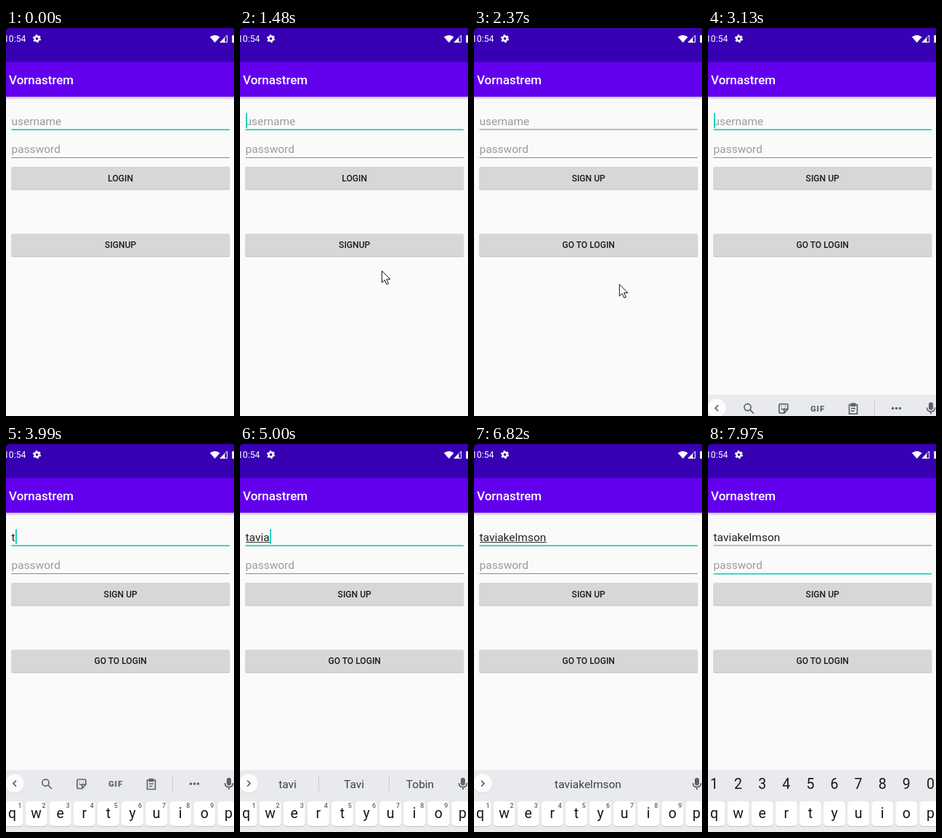
An HTML page for the animation above (8000 ms loop, 314 by 531 pixels).

```html
<!DOCTYPE html>
<html lang="en">
<head>
<meta charset="utf-8">
<title>Sign-up screen</title>
<style>
  html, body { margin: 0; width: 100%; height: 100%; overflow: hidden; background: #fafafa; }
  svg { display: block; width: 100vw; height: 100vh; font-family: Roboto, sans-serif; }
  .mid { text-anchor: middle; }
  .title { font-size: 17px; font-weight: 500; fill: #fff; }
  .field { font-size: 15.5px; }
  .label { font-size: 12.1px; font-weight: 500; fill: #1c1c1c; }
  .word { font-size: 15.5px; fill: #3c4043; }
  .key { font-size: 19.5px; fill: #15171a; }
  .hint { font-size: 9px; font-weight: 500; fill: #5f6368; }
  .icon { fill: none; stroke: #5f6368; stroke-width: 1.7; }
</style>
</head>
<body>
<svg id="stage" viewBox="0 0 314 531" preserveAspectRatio="none">
  <defs>
    <linearGradient id="shade" x2="0" y2="1">
      <stop stop-color="#000" stop-opacity=".25"/>
      <stop offset="1" stop-color="#000" stop-opacity="0"/>
    </linearGradient>
  </defs>
  <g id="screens"></g>

  <g id="status" fill="#fff">
    <path d="M0 0H5Q1 .6 0 3Z" fill="#000"/>
    <text x="-3" y="19" font-size="12.2">10:54</text>
    <g fill="none" stroke="#fff" transform="translate(42.5 14.5)">
      <circle r="3" stroke-width="2.4"/>
      <circle r="4.7" stroke-width="1.8" stroke-dasharray="2.6 2.32"/>
    </g>
    <path d="M280.8 12.3Q287.7 7 294.6 12.3L287.7 20Z"/>
    <path d="M295 19.5L304.5 10V19.5Z" fill="none" stroke="#fff"/>
    <path d="M295 19.5L301.5 13V19.5Z"/>
    <rect x="311.3" y="10" width="5" height="10"/>
  </g>

  <g id="keyboard">
    <rect y="446" width="314" height="320" fill="#e8eaed"/>
    <g id="bar">
      <circle cx="12" cy="465.2" r="13" fill="#c9cbce"/>
      <circle cx="12" cy="464.6" r="13" fill="#fcfcfc"/>
      <path id="chevron" class="icon"/>
      <g id="tools" class="icon">
        <circle cx="54.5" cy="463.5" r="4.6"/><path d="M58 467L63 472"/>
        <path d="M100 459H108Q110 459 110 461V466L105 471.500H100Q98 471.500 98 469.500V461Q98 459 100 459ZM110 466H105V471M101 465Q104 468 106 465M101 462.500H102M106 462.500H107"/>
        <text x="151" y="469" class="mid" font-size="11.500" font-weight="900" fill="#5f6368" stroke="none" letter-spacing=".8">GIF</text>
        <path d="M194.500 460H205.500V472.500H194.500ZM197.500 458.500H202.500V461.500H197.500ZM197 465H203M197 468.500H201.500"/>
        <path d="M229.500 455V475" stroke="#c8cacd" stroke-width="1"/>
        <g fill="#5f6368" stroke="none"><circle cx="254.500" cy="465" r="1.800"/><circle cx="259.500" cy="465" r="1.800"/><circle cx="264.500" cy="465" r="1.800"/></g>
      </g>
      <g id="words"></g>
      <path id="dividers" d="M108.500 455V475M205.500 455V475" stroke="#c8cacd"/>
      <g class="icon">
        <rect x="304.800" y="457.500" width="4.400" height="9" rx="2.200" fill="#5f6368"/>
        <path d="M301.500 464Q301.500 469.500 307 469.500T312.500 464M307 469.500V473"/>
      </g>
    </g>
    <g id="digits"></g>
    <g id="keys"></g>
    <g id="hints"></g>
  </g>

  <path id="mouse" d="M0 0V16L3.800 12.500L6.500 18.500L9 17.400L6.300 11.500H11.500Z" fill="#fff" stroke="#111" stroke-linejoin="round"/>
</svg>

<script>
const LOOP = 8000;
const NAME = "taviakelmson";
const ACCENT = "#0bd0bc";
const $ = id => document.getElementById(id);

function add(parent, tag, attrs = {}, text = "") {
  const el = document.createElementNS("http://www.w3.org/2000/svg", tag);
  for (const k in attrs) el.setAttribute(k, attrs[k]);
  el.textContent = text;
  return parent.appendChild(el);
}
const set = (el, attrs) => { for (const k in attrs) el.setAttribute(k, attrs[k]); };
const show = (el, on) => set(el, { opacity: +on });
const clamp = v => Math.min(1, Math.max(0, v));
const progress = (t, from, to) => clamp((t - from) / (to - from));
const within = (t, spans) => spans.some(([a, b]) => t >= a && t < b);

function makeField(parent, hint, y) {
  const text = add(parent, "text", { x: 7.5, y: y + 132.5, class: "field" }, hint);
  const mark = add(parent, "rect", { x: 8, y: y + 134, height: 1, fill: "#333" });
  const line = add(parent, "rect", { x: 7.5, width: 300.5 });
  const caret = add(parent, "rect", { y: y + 116.5, width: 1.8, height: 20.5, fill: ACCENT });
  return function update(value, focused, caretOn, marked) {
    const label = value || hint;
    if (text.textContent !== label) text.textContent = label;
    const width = value ? text.getComputedTextLength() : 0;
    set(text, { fill: value ? "#212121" : "#9b9b9b" });
    set(line, { y: y + 138.4, height: focused ? 1.6 : 1, fill: focused ? ACCENT : "#858585" });
    set(mark, { width: marked ? width : 0 });
    set(caret, { x: 8 + width });
    show(caret, caretOn);
  };
}

function makeButton(parent, label, y) {
  add(parent, "rect", { x: 7, y: y + 1, width: 301.5, height: 31.5, rx: 2, fill: "#000", opacity: .1 });
  add(parent, "rect", { x: 7.5, y: y + .5, width: 300.5, height: 31, rx: 1.5, fill: "#000", opacity: .12 });
  add(parent, "rect", { x: 7.5, y, width: 300.5, height: 30.5, rx: 1.5, fill: "#d6d7d7" });
  add(parent, "text", { x: 157.7, y: y + 19.8, class: "label mid" }, label);
}

function makeScreen(first, second) {
  const group = add($("screens"), "g");
  add(group, "rect", { x: -9, width: 333, height: 720, fill: "#fafafa" });
  add(group, "rect", { x: -9, width: 333, height: 47, fill: "#3700b3" });
  add(group, "rect", { x: -9, y: 46.5, width: 333, height: 47.5, fill: "#6200ee" });
  add(group, "rect", { x: -9, y: 94, width: 333, height: 4, fill: "url(#shade)" });
  add(group, "text", { x: 4, y: 77, class: "title" }, "Vornastrem");
  const user = makeField(group, "username", 0);
  const pass = makeField(group, "password", 38.5);
  makeButton(group, first, 189.8);
  makeButton(group, second, 281.5);
  return { group, user, pass };
}

const login = makeScreen("LOGIN", "SIGNUP");
const signup = makeScreen("SIGN UP", "GO TO LOGIN");

[..."qwertyuiop"].forEach((letter, i) => {
  const x = 8.5 + i * 33.1, digit = (i + 1) % 10;
  add($("keys"), "rect", { x: x - 15, y: 490, width: 30, height: 34, rx: 5, fill: "#bfc1c5" });
  add($("keys"), "rect", { x: x - 15, y: 489, width: 30, height: 34, rx: 5, fill: "#fff" });
  add($("keys"), "text", { x, y: 512, class: "key mid" }, letter);
  add($("hints"), "text", { x: x + 10.5, y: 497.5, class: "hint mid" }, digit);
  add($("digits"), "text", { x, y: 472, class: "key mid" }, digit);
});
const words = [65.5, 157, 248].map(x => add($("words"), "text", { x, y: 471, class: "word mid" }));

const typed = [3990, 4460, 4700, 4880, 5000, 5300, 5600, 5660, 5840, 5960, 6140, 6320];
const suggestions = [
  [4210, ["t", "T", "to"]],
  [4520, ["ta", "Ta", "take"]],
  [4700, ["tav", "Tav", "have"]],
  [4940, ["tavi", "Tavi", "Tobin"]],
  [5120, ["tavia", "Tavia", "gravitate"]],
  [5420, null]
];
const loginCaret = [[250, 740], [1220, 1720]];
const userCaret = [[2900, 3430], [3990, 6820], [7320, 7440]];
const passCaret = [[7440, 7970]];

// time, x, y of the pointer tip
const pointer = [
  [1360, 272, 382], [1480, 195, 332], [1780, 186, 300], [1960, 186, 300],
  [2140, 208, 387], [2330, 208, 387], [2620, 150, 128]
];

function movePointer(t) {
  const i = pointer.findIndex(p => p[0] > t);
  show($("mouse"), i > 0);
  if (i < 1) return;
  const [t0, x0, y0] = pointer[i - 1], [t1, x1, y1] = pointer[i];
  const p = progress(t, t0, t1);
  set($("mouse"), { transform: `translate(${x0 + (x1 - x0) * p + .5} ${y0 + (y1 - y0) * p + .5})` });
}

function drawSuggestions(t, value) {
  const entry = suggestions.filter(s => s[0] <= t).pop();
  const open = Boolean(entry);
  const list = !open ? ["", "", ""] : entry[1] || ["", value, ""];
  words.forEach((el, i) => { if (el.textContent !== list[i]) el.textContent = list[i]; });
  show($("tools"), !open);
  show($("dividers"), open && entry[1]);
  set($("chevron"), { d: open ? "M10 460.500L14 464.600L10 468.700" : "M14 460.500L10 464.600L14 468.700" });
}

function render(t) {
  const value = NAME.slice(0, typed.filter(at => at <= t).length);
  const onPassword = t >= 7440;

  login.user("", true, within(t, loginCaret), false);
  login.pass("", false, false, false);
  signup.user(value, t >= 2900 && !onPassword, within(t, userCaret), t >= 4170 && !onPassword);
  signup.pass("", onPassword, within(t, passCaret), false);

  const scale = 1 - .15 * (1 - progress(t, 2060, 2620)) ** 9;
  set(signup.group, {
    opacity: progress(t, 2060, 2110),
    transform: `translate(157.600 345) scale(${scale}) translate(-157.600 -345)`
  });

  const drop = 235 * (1 - progress(t, 3000, 3255)) ** 2;
  set($("keyboard"), { transform: `translate(0 ${drop})` });
  drawSuggestions(t, value);
  const numbers = progress(t, 7440, 7540);
  set($("bar"), { opacity: 1 - numbers });
  set($("hints"), { opacity: 1 - numbers });
  set($("digits"), { opacity: numbers });

  movePointer(t);
}

const start = performance.now();
function frame() {
  render((performance.now() - start) % LOOP);
  requestAnimationFrame(frame);
}
frame();
</script>
</body>
</html>
```
